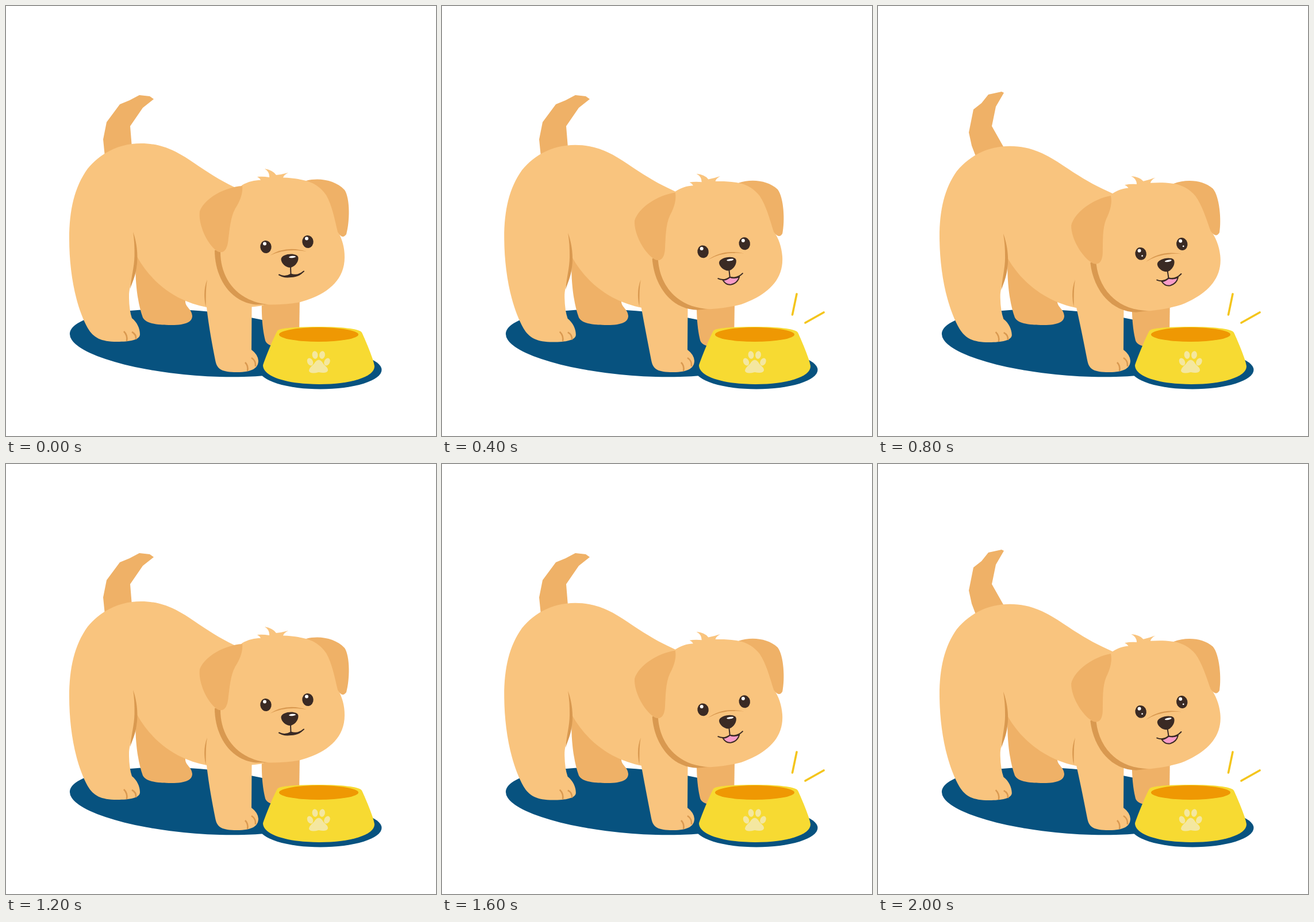
An HTML page that plays this animation: 748 px wide and 748 px high, repeating every 2.4 s.

```html
<!DOCTYPE html>
<html lang="en">
<head>
<meta charset="utf-8">
<title>Puppy and bowl</title>
<style>
html, body { margin: 0; width: 100%; height: 100%; overflow: hidden; background: #fff }
svg { display: block; width: 100vw; height: 100vh }
.coat { fill: #f9c47e }
.far { fill: #efb167 }
.fold { fill: #d99950 }
.toe { fill: none; stroke: #d99950; stroke-width: 2.6 }
.ink { fill: #3a2a24 }
.line { fill: none; stroke: #3a2a24; stroke-width: 2; stroke-linecap: round; stroke-linejoin: round }
.bowl { fill: #f7da32 }
.pad { fill: #f4e7a0 }
.spark { fill: none; stroke: #f4c51c; stroke-width: 3.6; stroke-linecap: round }
</style>
</head>
<body>
<svg id="stage" viewBox="0 0 748 748"></svg>
<script>
const stage = document.getElementById('stage');

const tails = {
  right: '172,262 169,232 175,202 198,171 215,164 232,155 250,157 257,162 238,177 216,209 219,246',
  mid: '172,262 166,237 167,212 185,177 202,168 217,156 239,157 243,160 226,177 208,211 218,248',
  left: '171,264 163,243 158,220 166,180 180,169 192,154 215,149 219,151 205,175 198,209 220,248'
};

// lean: body shift, 0..1; squash: body height; tilt and move: head
const poses = [
  { lean: 0, squash: 1, tilt: 0, move: '0 0', tail: 'right' },
  { lean: 0, squash: .994, tilt: -3.2, move: '-1.5 2', tail: 'left' },
  { lean: .6, squash: .994, tilt: -4, move: '-.5 2.6', tail: 'right', open: true, spark: true },
  { lean: 1, squash: .993, tilt: -4.6, move: '0 3', tail: 'mid', open: true },
  { lean: 1, squash: .989, tilt: -6.2, move: '1 3', tail: 'left', open: true, spark: true, glint: true }
];
const STEP = 200, LOOP = 1200;

const path = (cls, d) => `<path class="${cls}" d="${d}"/>`;
const oval = (x, y, rx, ry, fill, turn = 0) =>
  `<ellipse cx="${x}" cy="${y}" rx="${rx}" ry="${ry}" fill="${fill}" transform="rotate(${turn} ${x} ${y})"/>`;

const mat = oval(333, 586.5, 222.7, 56.3, '#07527f', 4.4) + oval(547, 633, 106.5, 33.5, '#07527f');

const farHindLeg = path('far', 'M226 425C223 470 228 515 238 542C243 552 262 555 288 555C314 555 324 549 324 539C323 526 311 524 312 512L290 460Z');

const farFrontLeg = lean => `<g transform="translate(${-3 * lean} 0)">` +
  path('far', 'M445 505C444 545 447 566 451 582Q454 591 472 593L510 575 511 505Z') + '</g>';

function body({ lean, squash }) {
  const skew = .0163 * lean;
  return `<g transform="matrix(1 0 ${skew} ${squash} ${-584 * skew} ${584 * (1 - squash) + lean})">` +
    path('coat', `M235 239C275 239 302 256 327 273C352 290 372 303 395 314L420 326 460 400 448 521Q400 528 349 524
      C300 515 255 485 228 436C226 468 214 482 214 505Q214 528 219 543C228 550 233 561 233 571C233 581 215 584 193 584
      C165 584 152 577 142 560C120 520 110 460 110 405C110 355 119 315 142 283C167 253 200 239 235 239Z`) +
    path('fold', 'M221 393C229 415 230 440 227 455C225 470 220 480 216 492C218 470 223 455 223.5 435Q224 412 221 393Z') +
    path('toe', 'M205 566Q212 573 210 583M219 567Q227 571 226 580') + '</g>';
}

const frontLeg = lean =>
  path('coat', `M${350 - 6 * lean} 480L${349 - 4 * lean} 524C353 560 359 590 364 616C367 632 375 637 402 637
    C428 637 439 630 439 617Q438 606 427 598L427.5 524 440 480Z`) +
  `<g transform="translate(${-7 * lean} 0)">` +
  path('fold', 'M350 476C344 490 344 508 347.5 523C348 508 347 492 350 476Z') + '</g>' +
  path('toe', 'M416 620Q422 626 420 635M427 612Q435 617 434 627');

const eye = (x, y, glint) => oval(x, y, 9.7, 11, '#3a2a24', -6) +
  oval(x - 2, y - 5.5, 3, 3, '#fff') + (glint ? oval(x + 2, y + 4, 1.4, 1.4, '#fff') : '');

const lip = 'M475 467.5Q485 473 495.5 466.5Q508 470.5 518 461.5';
const closedMouth = path('ink', lip + 'Q511 472 496 472Q481 474 475 467.5Z') + path('line', lip);
const openMouth = '<path class="line" style="fill:#f89cc8" d="M483 471Q488 480.5 497 479.5Q508 478 512 467Q503 470 495.5 466.5Q489 471 483 471Z"/>' +
  path('line', lip);

const head = ({ tilt, move, open, glint }) =>
  `<g transform="translate(${move}) rotate(${tilt} 536 385)">` +
  path('fold', 'M363 425C363 470 388 515 435 519.5L456 519 440 490 385 420Z') +
  path('coat', `M410 312C422 305 432 303 443 303Q441 299 437 297Q447 296 458 298Q459 289 450 283Q465 286 470 294
    Q480 293 491 290Q483 294 482 298.5C497 299 511 301 522 304C560 305 580 345 577 391C585 406 589 420 589 437
    C589 480 555 503 512 515Q490 519.5 458 519.5C400 514 373 472 373 428Z`) +
  path('far', 'M411 313C380 315 345 335 337 357C334 380 350 415 368 427Q382 433 386 412C389 390 390 368 399 352Q413 330 411 313Z') +
  path('far', 'M522 304C545 298 573 303 589 320C599 335 598 376 592 397Q585 407 577 393C572 372 567 346 557 329Q544 310 522 304Z') +
  eye(452, 419, glint) + eye(525, 410, glint) +
  path('fold', 'M459 434Q487 416 523 427Q487 420.5 459 434Z') +
  path('ink', 'M478.5 441C478 430 508 428 508.5 438C509 447 500 455 494 455C487 455 479 448 478.5 441Z') +
  oval(498, 436.5, 6, 1.7, '#fff', -5) +
  path('line', 'M495 454L495.5 467') + (open ? openMouth : closedMouth) + '</g>';

const bowl =
  path('bowl', `M473 564C468 570 449 617 447 625C447 645 490 658 545 658C600 658 641 645 641 627
    C640 615 622 574 619 568C615 561 580 558 545 558C505 558 478 560 473 564Z`) +
  oval(544, 571.5, 69, 12.5, '#ef9803') +
  path('pad', 'M527 635C527 628 536 624 538 619Q544 612 550 619C552 625 561 628 560 634Q558 640 544 637Q530 641 527 635Z') +
  [[529, 619, -25], [537.5, 607, -8], [550, 607, 8], [558.5, 619, 25]]
    .map(([x, y, turn]) => oval(x, y, 4.9, 6.8, '#f4e7a0', turn)).join('');

const sparks = path('spark', 'M609.5 537L617 501M632 551L664 533');

const scene = pose => mat + farHindLeg + farFrontLeg(pose.lean) +
  `<polygon class="far" points="${tails[pose.tail]}"/>` +
  body(pose) + frontLeg(pose.lean) + head(pose) + bowl + (pose.spark ? sparks : '');

let shown = -1;
function tick() {
  const index = Math.min(poses.length - 1, Math.floor(performance.now() % LOOP / STEP));
  if (index !== shown) stage.innerHTML = scene(poses[shown = index]);
  requestAnimationFrame(tick);
}
tick();
</script>
</body>
</html>
```
